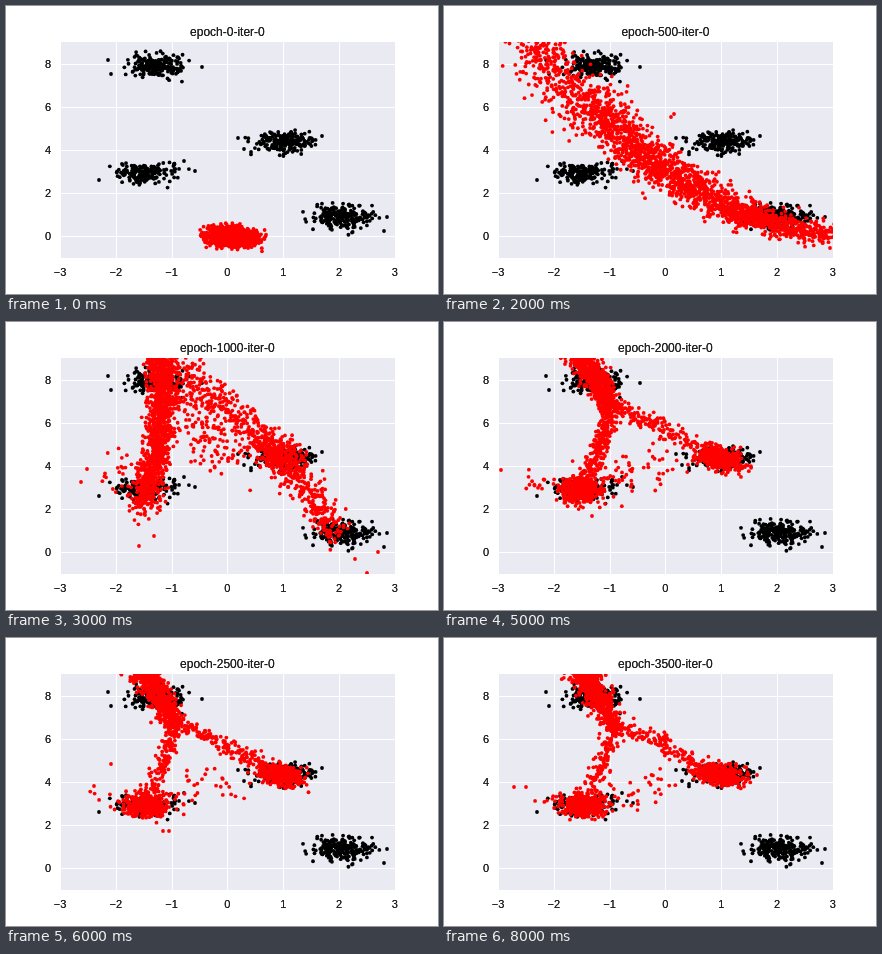
Write an HTML page with a canvas that moves like this. It is 432 px wide and 288 px high and loops after 9000 ms.

```html
<!DOCTYPE html>
<html lang="en">
<head>
<meta charset="utf-8">
<title>Training scatter</title>
<style>
html, body { margin: 0; width: 100%; height: 100%; overflow: hidden; background: #fff; }
canvas { display: block; width: 432px; height: 288px; }
</style>
</head>
<body>
<canvas id="stage" width="432" height="288"></canvas>
<script>
const ctx = document.getElementById('stage').getContext('2d');
const FONT = '"Liberation Sans", Arial, sans-serif';
const LEFT = 54, TOP = 36, WIDTH = 334.8, HEIGHT = 216;
const STEP = 1000, STAGES = 9;

let seed = 11;
function rand() {
  seed = (seed + 0x6D2B79F5) | 0;
  let t = Math.imul(seed ^ (seed >>> 15), 1 | seed);
  t = (t + Math.imul(t ^ (t >>> 7), 61 | t)) ^ t;
  return ((t ^ (t >>> 14)) >>> 0) / 4294967296;
}

// Bell-shaped random number, held within three deviations
function gauss() {
  for (;;) {
    const g = Math.sqrt(-2 * Math.log(1 - rand())) * Math.cos(2 * Math.PI * rand());
    if (Math.abs(g) <= 3) return g;
  }
}

const lerp = (a, b, t) => a + (b - a) * t;

function blob(n, x, y, sx, sy, tilt = 0) {
  return Array.from({ length: n }, () => {
    const g = gauss();
    return [x + g * sx, y + g * tilt + gauss() * sy];
  });
}

// Dots along a quadratic curve a-b-c; spread goes from s to e
function band(n, a, b, c, s, e = s) {
  return Array.from({ length: n }, () => {
    const t = rand();
    const at = i => lerp(lerp(a[i], b[i], t), lerp(b[i], c[i], t), t) + gauss() * lerp(s[i], e[i], t);
    return [at(0), at(1)];
  });
}

const black = [
  blob(215, 150, 60, 14.5, 5.6), [[102, 54], [105, 68], [196, 61]],
  blob(200, 277, 136, 14, 5.2), [[232, 132], [238, 143], [316, 130]],
  blob(205, 140, 167, 14.5, 5.2), [[93, 174], [189, 165], [178, 155]],
  blob(215, 335, 211, 14, 6), [[381, 211], [378, 225]]
].flat();

function clump(k) {
  return blob(1500, 226 + 4 * k, 231 + 2 * k, 11.5, 4.7, 0.8);
}

function sweep() {
  return [
    band(1550, [70, 12], [205, 203], [390, 231], [15, 14], [12, 4]),
    band(480, [145, 92], [205, 162], [260, 187], [12, 12], [11, 8]),
    band(230, [275, 199], [300, 209], [330, 217], [12, 6]),
    [[230, 108], [227, 111], [386, 242]]
  ].flat();
}

function arch() {
  return [
    band(1350, [151, 22], [166, 100], [136, 183], [7, 6], [7.5, 8]),
    band(640, [165, 44], [275, 115], [328, 212], [12, 9], [7, 8]),
    band(200, [252, 119], [272, 132], [288, 144], [10, 8]),
    band(150, [170, 75], [190, 115], [230, 132], [11, 17]),
    blob(20, 112, 148, 10, 11),
    [[75, 160], [81, 147], [133, 224], [148, 214], [361, 251], [349, 237], [372, 230]]
  ].flat();
}

// Clusters joined by thinning branches; k runs from loose to settled
function branches(k, strays) {
  const m = (a, b) => lerp(a, b, k);
  const hub = [m(162, 170), m(80, 87)];
  const low = [m(131, 140), m(170, 167)];
  return [
    band(650, [135, 29], [148, 52], hub, [8.5, 5], [5, 6]),
    band(m(360, 130), hub, [m(164, 166), m(118, 112)], [low[0] + 3, 160], [m(5, 4), 6]),
    band(m(190, 145), hub, [210, 100], [258, 128], [6, m(5, 4)]),
    blob(460, m(277, 274.5), 136.5, m(9.5, 11.5), 5.2, m(1, 2.3)),
    blob(m(460, 400), low[0], low[1], m(8, 11), m(6.6, 5.8), m(0, 0.4)),
    band(m(85, 30), [158, 163], [190, m(140, 155)], [m(245, 226), 143], [13, 10]),
    blob(m(22, 4), m(84, 106), m(155, 161), 11, m(11, 5)),
    strays
  ].flat();
}

const builders = [
  () => clump(0),
  () => clump(1),
  sweep,
  arch,
  () => branches(0, [[62, 125], [61, 162], [108, 42], [300, 119]]),
  () => branches(0.5, [[57, 148], [148, 194], [301, 145]]),
  () => branches(0.85, [[105, 126], [88, 148], [157, 193], [163, 193]]),
  () => branches(0.93, [[62, 152], [342, 146]]),
  () => branches(1, [[70, 149], [82, 149], [313, 137]])
];
const red = builders.map((build, i) => {
  seed = 21 + i;
  return build();
});

const px = v => LEFT + (v + 3) * WIDTH / 6;
const py = v => TOP + (9 - v) * HEIGHT / 10;
const epoch = i => i < 2 ? i : (i - 1) * 500;

function label(text, x, y, size, align) {
  ctx.font = size + 'px ' + FONT;
  ctx.textAlign = align;
  ctx.fillStyle = '#222';
  // Two passes give the heavier edge of the lettering
  for (let i = 0; i < 2; i++) ctx.fillText(text, x, y);
}

function plot(dots, color) {
  ctx.fillStyle = color;
  for (const [x, y] of dots) {
    ctx.beginPath();
    ctx.arc(x, y, 1.9, 0, 2 * Math.PI);
    ctx.fill();
  }
}

function draw(i) {
  ctx.fillStyle = '#fff';
  ctx.fillRect(0, 0, 432, 288);
  ctx.fillStyle = '#eaeaf2';
  ctx.fillRect(LEFT, TOP, 335, HEIGHT);
  ctx.fillStyle = '#fff';
  for (let v = -3; v <= 3; v++) ctx.fillRect(Math.round(px(v)), TOP, 1, HEIGHT);
  for (let v = 0; v <= 8; v += 2) ctx.fillRect(LEFT, Math.round(py(v)), 335, 1);

  ctx.save();
  ctx.beginPath();
  ctx.rect(LEFT, TOP, 335, HEIGHT);
  ctx.clip();
  plot(black, '#000');
  plot(red[i], '#f00');
  ctx.restore();

  for (let v = -3; v <= 3; v++) label(String(v).replace('-', '\u2212'), px(v), 270, 11, 'center');
  for (let v = 0; v <= 8; v += 2) label(String(v), 45, py(v) + 4, 11, 'right');
  label('epoch-' + epoch(i) + '-iter-0', LEFT + WIDTH / 2, 29.5, 12, 'center');
}

let shown = -1;
const begin = performance.now();
function tick() {
  const i = Math.floor((performance.now() - begin) / STEP) % STAGES;
  if (i !== shown) draw(shown = i);
  requestAnimationFrame(tick);
}
tick();
</script>
</body>
</html>
```
